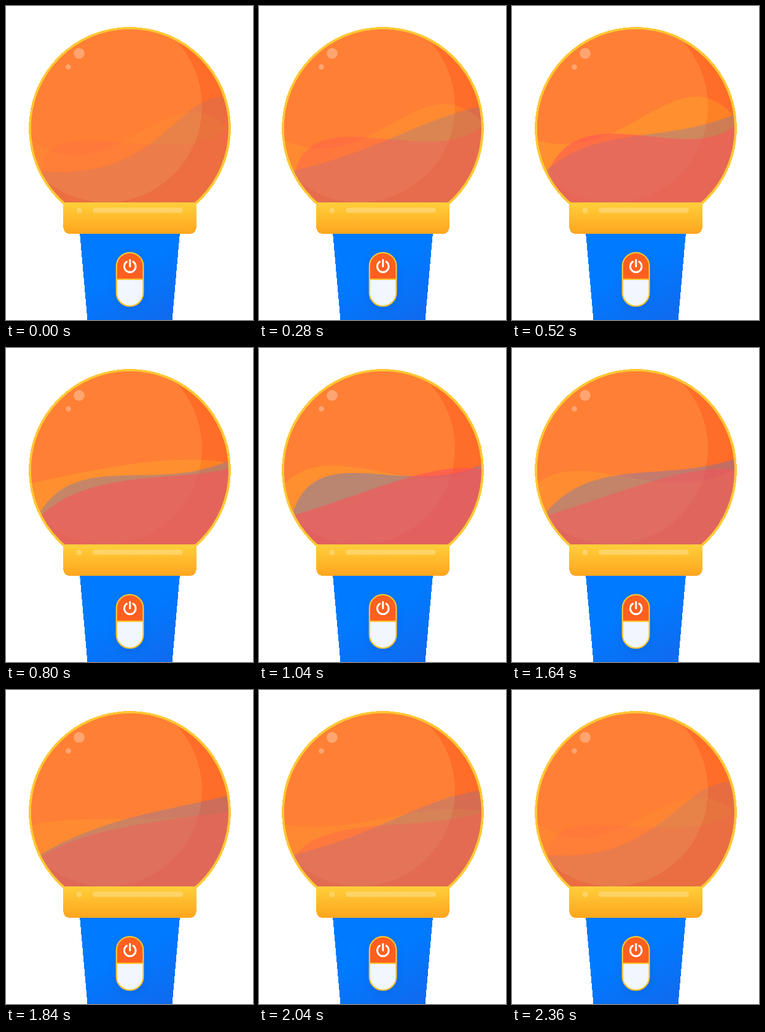
An HTML page that plays this animation: 402 px wide and 510 px high, repeating every 2.4 s.

```html
<!DOCTYPE html>
<html lang="en">
<head>
<meta charset="utf-8">
<title>Wave globe</title>
<style>
  html, body { margin: 0; width: 100%; height: 100%; overflow: hidden; background: #fff; }
  svg { display: block; width: 402px; height: 510px; }
  .crisp { shape-rendering: crispEdges; }
</style>
</head>
<body>
<svg viewBox="0 0 402 510">
  <defs>
    <clipPath id="ball"><circle cx="201.5" cy="198.5" r="160.5"/></clipPath>
    <clipPath id="pill"><rect x="180" y="401" width="43.5" height="86.5" rx="21.75"/></clipPath>
    <linearGradient id="gold" x2="0" y2="1">
      <stop stop-color="#ffcf3a"/><stop offset="1" stop-color="#ffa51e"/>
    </linearGradient>
    <linearGradient id="blue" x1=".3" y1=".1" x2=".8" y2="1">
      <stop offset=".35" stop-color="#007aff"/><stop offset="1" stop-color="#0f6bf0"/>
    </linearGradient>
    <filter id="soft" x="-50%" y="-50%" width="200%" height="200%"><feGaussianBlur stdDeviation="6"/></filter>
  </defs>

  <circle class="crisp" cx="201.5" cy="198.5" r="164.5" fill="#ffc734"/>
  <g clip-path="url(#ball)">
    <circle cx="201.5" cy="198.5" r="163" fill="#ff6d28"/>
    <circle cx="163" cy="163" r="156" fill="#ff7f35"/>
    <g id="waves"></g>
  </g>
  <g fill="#fff" fill-opacity=".3">
    <circle cx="119" cy="77" r="8.8"/>
    <circle cx="101.5" cy="99" r="4.4"/>
  </g>

  <path class="crisp" d="M120 368H283L270.5 510H132.5Z" fill="url(#blue)"/>
  <path class="crisp" d="M98 319H305Q310 319 310 324V357Q310 370.4 296 370.4H107Q93 370.4 93 357V324Q93 319 98 319Z" fill="url(#gold)"/>
  <g fill="#fff" fill-opacity=".25">
    <circle cx="119" cy="332" r="4.5"/>
    <rect x="141" y="327.5" width="147" height="8.5" rx="4.2"/>
  </g>

  <rect x="180" y="403" width="44" height="88" rx="22" fill="#0a3f9c" opacity=".22" filter="url(#soft)"/>
  <g clip-path="url(#pill)">
    <rect x="179" y="400" width="46" height="44" fill="#ff5f1f"/>
    <rect x="179" y="444" width="46" height="45" fill="#f1f6ff"/>
  </g>
  <g fill="none" stroke="#ffc432" stroke-width="2.2">
    <rect x="179.8" y="400.7" width="43.6" height="86.8" rx="21.8"/>
    <path d="M180 443.8H223.5"/>
  </g>
  <path d="M196.5 415.3A9.3 9.3 0 1 0 207 415.3M201.75 412.5V423" fill="none" stroke="#fff" stroke-width="3" stroke-linecap="round"/>
</svg>

<script>
const LOOP = 2400, STEP = 40;
const keyTimes = [0, 520, 1280, LOOP];

// Each wave is one cubic curve that morphs through three poses and back.
const pose = (x1, y1, x2, y2, end, alpha) => [x1, y1, x2, y2, end, alpha];
const waves = [
  { color: "#ffc81e", start: [43, 219], poses: [
    pose(180, 308, 255, 106, 197, .07),
    pose(190, 257, 270, 76, 180, .22),
    pose(90, 90, 250, 335, 196, .22)] },
  { color: "#286eff", start: [55, 268], poses: [
    pose(252, 288, 275, 140, 147, .1),
    pose(140, 192, 250, 224, 176, .22),
    pose(75, 122, 230, 257, 196, .36)] },
  { color: "#ff5058", start: [58, 271], poses: [
    pose(60, 160, 270, 272, 198, .12),
    pose(112, 142, 278, 260, 195, .5),
    pose(190, 287, 290, 145, 198, .63)] }
];

const group = document.getElementById("waves");
for (const w of waves) {
  w.path = document.createElementNS("http://www.w3.org/2000/svg", "path");
  w.path.setAttribute("fill", w.color);
  group.append(w.path);
}

function draw(now) {
  const t = Math.floor(now % LOOP / STEP) * STEP;
  const k = keyTimes.findIndex(key => key > t) - 1;
  const u = (t - keyTimes[k]) / (keyTimes[k + 1] - keyTimes[k]);
  for (const { start, poses, path } of waves) {
    const next = poses[(k + 1) % poses.length];
    const [x1, y1, x2, y2, end, alpha] = poses[k].map((v, i) => v + (next[i] - v) * u);
    path.setAttribute("d", `M${start}C${x1} ${y1} ${x2} ${y2} 362 ${end}V370H${start[0]}Z`);
    path.setAttribute("fill-opacity", alpha);
  }
}

const begin = performance.now();
function tick() {
  draw(performance.now() - begin);
  requestAnimationFrame(tick);
}
tick();
</script>
</body>
</html>
```
